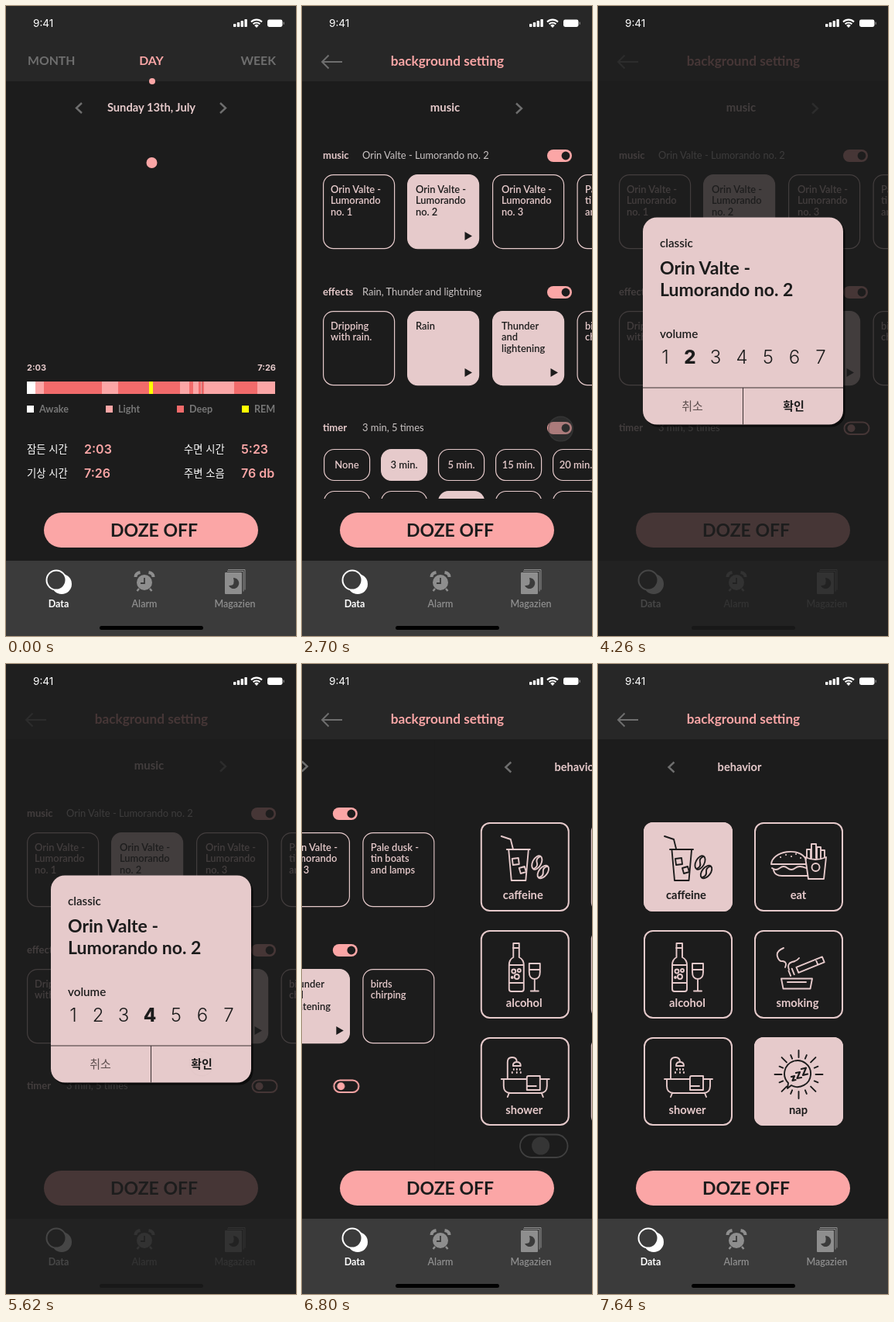
An HTML page for the animation above (8000 ms loop, 375x812 px).

```html
<!DOCTYPE html>
<html lang="ko">
<head>
<meta charset="utf-8">
<title>Sleep app</title>
<style>
html, body { margin: 0; width: 100%; height: 100%; overflow: hidden; background: #1c1c1c; }
svg { display: block; }
text { font-family: Lato, sans-serif; white-space: pre; }
.n { font-family: Inter, sans-serif; }
.k { font-family: 'Noto Sans CJK KR', 'Noto Sans CJK', sans-serif; }
.icon { fill: none; stroke-width: 1.9; stroke-linecap: round; stroke-linejoin: round; }
</style>
</head>
<body>
<svg id="stage" width="375" height="812" viewBox="0 0 375 812"></svg>
<script>
const PINK = '#fba6a6', PALE = '#e6cacb', DARK = '#1c1c1c', RED = '#f26b6b', GREY = '#6e6e6e';
const LOOP = 8000, PAGE_GAP = 449;

// Drawing helpers
const text = (x, y, s, size, fill, { w = 400, a = 'start', c = '', id = '' } = {}) =>
  `<text id="${id}" class="${c}" x="${x}" y="${y}" font-size="${size}" font-weight="${w}" fill="${fill}" text-anchor="${a}">${s}</text>`;
const rect = (x, y, w, h, fill, r = 0, extra = '') =>
  `<rect x="${x}" y="${y}" width="${w}" height="${h}" rx="${r}" fill="${fill}" ${extra}/>`;
const disc = (x, y, r, fill, extra = '') => `<circle cx="${x}" cy="${y}" r="${r}" fill="${fill}" ${extra}/>`;
const line = (d, stroke, w = 2, extra = '') => `<path d="${d}" fill="none" stroke="${stroke}" stroke-width="${w}" ${extra}/>`;
const group = (id, body, extra = '') => `<g id="${id}" ${extra}>${body}</g>`;
const chevron = (x, y, dir) => line(`M${x - 3.5 * dir} ${y - 6.5}l${7 * dir} 6.5l${-7 * dir} 6.5`, GREY, 2.4);

function statusBar() {
  const bars = [4, 6, 8, 10].map((h, i) => rect(294 + i * 4.8, 27 - h, 3.4, h, '#fff', 0.8)).join('');
  const wifi = line('M317 20.5a10 10 0 0 1 14 0M319.6 23.3a6.4 6.4 0 0 1 8.8 0', '#fff', 2.1) +
    '<path d="M324 28l-2.8-3a4 4 0 0 1 5.6 0z" fill="#fff"/>';
  return text(35, 27, '9:41', 13.6, '#fff', { c: 'n' }) + bars + wifi +
    rect(338, 17.5, 19.5, 9.5, '#fff', 2.4) + rect(358.5, 20.5, 1.5, 3.5, '#777', 0.7);
}

function dataPage() {
  const P = PINK, stages = [[27, '#fff'], [38, P], [49, RED], [124, P], [145, RED], [185, '#ff0'], [190, RED], [225, P],
    [237, RED], [242, P], [249, RED], [252, P], [253.5, RED], [256, P], [295, RED], [325, P], [348]];
  const bar = stages.slice(0, -1).map(([x, c], i) => rect(x, 484, stages[i + 1][0] - x, 16, c)).join('');
  const legend = [[27, '#fff', 'Awake'], [129, P, 'Light'], [221, RED, 'Deep'], [305, '#ff0', 'REM']]
    .map(([x, c, s]) => rect(x, 515, 9, 9, c) + text(x + 16, 524, s, 12.6, '#777', { w: 700 })).join('');
  const facts = [[27, 576, '잠든 시간', '2:03'], [27, 607, '기상 시간', '7:26'], [230, 576, '수면 시간', '5:23'], [230, 607, '주변 소음', '76 db']]
    .map(([x, y, s, v]) => text(x, y, s, 13.3, '#fff', { w: 500, c: 'k' }) + text(x + 74, y + 1, v, 16, P, { w: 600, c: 'n' })).join('');
  const small = { w: 700, c: 'n' };
  return text(28, 76, 'MONTH', 15.8, GREY, { w: 700 }) + text(188, 76, 'DAY', 15.8, P, { w: 700, a: 'middle' }) +
    text(349, 76, 'WEEK', 15.8, GREY, { w: 700, a: 'end' }) + disc(189, 97, 4, P) +
    chevron(94.5, 131.5, -1) + chevron(280.5, 131.5, 1) +
    text(188, 136, 'Sunday 13th, July', 14.7, PALE, { w: 700, a: 'middle' }) +
    group('score', disc(188.5, 309.5, 108, 'none', `stroke="${P}" stroke-width="1.3"`) +
      text(134, 318, '6<tspan dy="7">7</tspan>', 70, P) + text(207, 326, '/100', 15.3, P, { w: 300 }) +
      text(142, 361, '잠을 설치셨나요? :(', 12.6, PALE, { w: 350, c: 'k' })) +
    group('dot', disc(188.5, 202, 7, P)) +
    text(27, 470, '2:03', 11, PALE, small) + text(349, 470, '7:26', 11, PALE, { ...small, a: 'end' }) + bar + legend + facts;
}

const toggle = y => rect(317, y - 8, 32, 16, PINK, 8) + disc(341, y, 5.4, DARK);
function card(x, y, tx, lines, on) {
  return rect(x + 0.6, y + 0.6, 92, 95, on ? PALE : 'none', 13, `stroke="${PALE}" stroke-width="1.2"`) +
    lines.map((s, i) => text(tx, y + 24 + i * 14.4, s, 12.9, on ? DARK : PALE, { w: 600 })).join('') +
    (on ? `<path d="M${tx + 63.5} ${y + 74}l9.5 5.5l-9.5 5.5z" fill="${DARK}"/>` : '');
}
const rowHead = (y, name, info) => text(27, y, name, 13, PALE, { w: 700 }) + text(78, y, info, 12.9, '#c9c3c3');

function musicPage() {
  const xs = [[27, 37], [136, 147], [246, 258], [355.5, 366]];
  const cards = (y, list, on) => list.map((s, i) => card(xs[i][0], y, xs[i][1], s.split('/'), on.includes(i))).join('');
  const pill = (i, y, on) => rect(28.6 + 74 * i, y, 59, 40, on ? PALE : 'none', 13, `stroke="${PALE}" stroke-width="1.2"`);
  const times = ['None', '3 min.', '5 min.', '15 min.', '20 min.'].map((s, i) =>
    pill(i, 571.5, i == 1) + text(58 + 74 * i, 595.5, s, 13, i == 1 ? DARK : PALE, { w: 600, a: 'middle' }) + pill(i, 625.5, i == 2)).join('');
  const song = n => `Orin Valte -/Lumorando/no. ${n}`;
  return text(185, 136, 'music', 14.9, PALE, { w: 700, a: 'middle' }) + chevron(280.5, 132, 1) +
    rowHead(197, 'music', 'Orin Valte - Lumorando no. 2') + toggle(193) +
    cards(217, [song(1), song(2), song(3), 'Pale dusk -/tin boats/and lamps'], [1]) +
    rowHead(373, 'effects', 'Rain, Thunder and lightning') + toggle(369) +
    cards(393, ['Dripping/with rain.', 'Rain', 'Thunder/and/lightening', 'birds/chirping'], [1, 2]) +
    rowHead(548, 'timer', '3 min, 5 times') +
    group('timerOn', toggle(544) + `<svg y="560" width="375" height="75" viewBox="0 560 375 75">${times}</svg>`) +
    group('timerOff', rect(318.5, 536.5, 32, 15.5, 'none', 7.8, `stroke="${PINK}" stroke-width="2"`) + disc(327.5, 544.2, 5, PINK));
}

const sunRays = Array.from({ length: 16 }, (_, i) => {
  const a = i * Math.PI / 8, p = r => `${(259.5 + r * Math.sin(a)).toFixed(1)} ${(529 - r * Math.cos(a)).toFixed(1)}`;
  return `M${p(22)}L${p(i % 2 ? 27 : 31)}`;
}).join('');

// name, column, row, label centre, icon path, extra icon markup
const habits = [
  ['caffeine', 0, 0, 114, 'M86 222l12 4l3 12M93 239h30M95.500 240l3.500 39h18.500l3.500-39M100 251l8-1l1 8l-8 1zM109 263l7-2l2 7l-7 2z',
    '<g transform="rotate(28 132 256)"><ellipse cx="132" cy="256" rx="5.500" ry="9.500"/><path d="M132 247q-4 5 0 9t0 9"/></g><g transform="rotate(38 140 268)"><ellipse cx="140" cy="268" rx="5.500" ry="9.500"/><path d="M140 259q-4 5 0 9t0 9"/></g>'],
  ['eat', 1, 0, 259, 'M224 258c1-17 37-23 45-6M224 258h45M225 263q5 4 10 0t10 0t10 0t14 0M227 266q2 7 11 7h33M268 249l4 28h20l3-28q-14 6-27 0zM270 249v-10h5v11M276 250v-18h6v18M283 250v-14h5v14M288 240h5v9M236 249h.1M243 246h.1M250 248h.1M256 245h.1M262 250h.1',
    '<circle cx="281.500" cy="262" r="5"/>'],
  ['alcohol', 0, 1, 115.5, 'M101.500 360h7.500v18q6 3 6 10v31q0 3-3 3h-13q-3 0-3-3v-31q0-7 5.500-10zM101 366h8M96 388h19M96 411h19M122 386h14v11q0 9-7 9t-7-9zM122 394h14M129 406v15M124 421.500h10',
    '<circle cx="102" cy="396" r="2.500"/><circle cx="109" cy="395" r="2"/><circle cx="106" cy="403" r="3"/><circle cx="100" cy="404" r="1"/>'],
  ['smoking', 1, 1, 258, 'M240 366q-10 4-8 11t7 6q6 1 3 8M247 394q-3-8 4-10q6-1 9-5M237 405.500h40l-2.500 13h-35zM245 410h24',
    '<g transform="rotate(-22 268 390)"><path d="M257 386.500h36v7.500h-36zM284 386.500v7.500M251 386v8M246 387v7"/></g>'],
  ['shower', 0, 2, 115.5, 'M94 534v-21q0-6 6-6t6 6M101 518q0-5 5-5t5 5zM102 522v1M106 522v1M110 522v1M100 526v1M106 526v1M111 526v1M86 535h33M136 535h12M89 535v9q0 9 9 9h38q9 0 9-9v-9M96 553l-2 5M138 553l2 5M121 531h15v18h-17v-16q0-2 2-2zM119 544h12', ''],
  ['nap', 1, 2, 259, sunRays + 'M250 543l-5 4l1-7a17 17 0 1 1 4 3z',
    '<g stroke-width="2.200"><path d="M250 532l4-1l-2.500 6l4-1M256 527l5-1l-3.500 8l5.500-1M263 522l6-1.500l-4 9.500l6-1.500"/></g>']
];
function habitCard([name, col, row, cx, d, extra], on) {
  const x = 60 + 143 * col, y = [205, 344, 482][row], ink = on ? DARK : PALE;
  return rect(x, y, 113, row ? 112 : 113, on ? PALE : DARK, 11, `stroke="${PALE}" stroke-width="2"`) +
    `<g class="icon" stroke="${ink}"><path d="${d}"/>${extra}</g>` +
    text(cx, [303, 442, 580][row], name, 14.7, ink, { w: 700, a: 'middle' });
}
function behaviorPage() {
  return rect(0, 98, 375, 555, DARK) +
    chevron(95, 133, -1) + text(183, 138, 'behavior', 14.6, PALE, { w: 700, a: 'middle' }) +
    habits.map(h => habitCard(h, false)).join('') +
    group('caffeineOn', habitCard(habits[0], true)) + group('napOn', habitCard(habits[5], true));
}

function tabBar() {
  const g = '#8e8e8e', bg = '#3b3b3b';
  const label = (x, s, c, w) => text(x, 775, s, 12.5, c, { w, a: 'middle' });
  return rect(0, 715, 375, 97, bg) +
    disc(72, 745, 13, '#fff') + disc(65, 740, 12.5, bg, 'stroke="#fff" stroke-width="2"') +
    line('M167.500 736q0-5 6-6M190.500 736q0-5-6-6', g, 4) + line('M172 751l-2.500 3M186 751l2.500 3', g, 2.5) +
    disc(179, 743, 10, g) + line('M179 737v7h-5', bg, 1.8) +
    line('M286 728.500h21v26M287 726.500h22v26', g, 1) + rect(283, 730, 22, 28, g, 1) +
    `<path d="M294 737a7 7 0 1 1-6 10q9 1 6-10z" fill="${bg}"/>` +
    label(68, 'Data', '#fff', 700) + label(179, 'Alarm', g, 600) + label(296, 'Magazien', g, 600) +
    rect(121, 799, 134, 5, '#000', 2.5);
}

function dialog() {
  const nums = [87, 119, 152, 186, 220, 254, 288].map((x, i) =>
    text(x, 461, i + 1, 24, DARK, { w: 300, a: 'middle', c: 'n', id: 'thin' + (i + 1) }) +
    ([1, 3].includes(i) ? text(x, 461, i + 1, 24, DARK, { w: 800, a: 'middle', c: 'n', id: 'bold' + (i + 1) }) : '')).join('');
  return rect(60.5, 275.5, 259, 267, '#000', 18, 'opacity=".6"') + rect(58, 272.5, 259, 267, PALE, 18) +
    text(80, 311, 'classic', 15.2, DARK, { w: 600 }) +
    text(80, 346, 'Orin Valte -', 23, DARK, { w: 700 }) + text(80, 374, 'Lumorando no. 2', 23, DARK, { w: 700 }) +
    text(80, 427.5, 'volume', 15.2, DARK, { w: 600 }) + nums + line('M58 492h259M187.500 492v47.500', '#3a3030', 1) +
    text(122, 521, '취소', 15, '#5d4e4e', { w: 500, a: 'middle', c: 'k' }) + text(253, 521, '확인', 15, DARK, { w: 700, a: 'middle', c: 'k' });
}

// Touch markers: x, y, appear, press, gone
const taps = [
  [189, 674, 760, 960, 1590], [334.5, 545, 2700, 2900, 3490], [182, 295.5, 3640, 3840, 4260],
  [186, 452, 4560, 4760, 5160], [253, 515, 5180, 5380, 5630]
];
const ring = 'stroke="#404040" stroke-width="1.8"';

document.getElementById('stage').innerHTML =
  rect(0, 0, 375, 812, DARK) + rect(0, 0, 375, 97, '#272727') +
  group('data', dataPage()) +
  group('settings', line('M52 72h-26M34.500 63.500l-8.500 8.500l8.500 8.500', GREY, 2) +
    text(188, 77, 'background setting', 17.2, PINK, { w: 700, a: 'middle' }) +
    group('pages', musicPage() + group('', behaviorPage(), `transform="translate(${PAGE_GAP})"`))) +
  rect(49, 653, 277, 45, PINK, 22.5) + text(191.5, 684, 'DOZE OFF', 23, DARK, { w: 700, a: 'middle' }) +
  tabBar() +
  group('modal', rect(0, 0, 375, 812, '#1e1e1e', 0, 'opacity=".82"') + dialog()) +
  statusBar() +
  taps.map(([x, y], i) => group('tap' + i, disc(x, y, 15.6, 'none', ring) + disc(x, y, 15, '#444', 'fill-opacity=".65"'))).join('') +
  group('swipe', rect(282, 606.5, 61.5, 29.5, 'none', 14.7, ring) + disc(0, 621, 11.5, '#444', 'id="thumb" fill-opacity=".65"'));

const $ = id => document.getElementById(id);
const fade = (id, v) => $(id).setAttribute('opacity', v);
const ramp = (t, a, b) => Math.min(1, Math.max(0, (t - a) / (b - a)));

// cubic-bezier(.42, 0, .58, 1) between times a and b
function ease(t, a, b) {
  const p = ramp(t, a, b);
  let lo = 0, hi = 1, s = p;
  for (let i = 0; i < 20; i++) {
    const x = 1.26 * s * (1 - s) ** 2 + 1.74 * s * s * (1 - s) + s ** 3;
    if (x < p) lo = s; else hi = s;
    s = (lo + hi) / 2;
  }
  return p == 0 || p == 1 ? p : s * s * (3 - 2 * s);
}

function draw(t) {
  const intro = ease(t, 0, 510);
  $('dot').setAttribute('transform', `rotate(${241 * intro} 188.5 309.5)`);
  fade('score', intro);

  const open = ease(t, 1130, 1570);
  fade('data', 1 - open);
  fade('settings', open);

  const off = ease(t, 3060, 3490);
  fade('timerOn', 1 - off);
  fade('timerOff', off);

  fade('modal', t < 5780 ? ease(t, 3960, 4260) : 0);
  const volume = ease(t, 4920, 5160);
  fade('bold2', 1 - volume);
  fade('thin2', volume);
  fade('bold4', volume);
  fade('thin4', 1 - volume);

  taps.forEach(([, , a, press, end], i) => {
    fade('tap' + i, t < a ? 0 : ramp(t, a - 120, a + 60) * (1 - ease(t, Math.min(press + 170, end - 120), end)));
    $('tap' + i).lastChild.setAttribute('r', 15 - 4 * ease(t, press, press + 160));
  });

  const slide = ease(t, 6380, 7120);
  $('pages').setAttribute('transform', `translate(${-PAGE_GAP * slide})`);
  $('thumb').setAttribute('cx', 329 - 33 * slide);
  fade('swipe', ramp(t, 6400, 6480) * (1 - ramp(t, 7100, 7220)));
  fade('napOn', +(t >= 7360));
  fade('caffeineOn', +(t >= 7640));
}

const start = performance.now();
function tick() {
  draw((performance.now() - start) % LOOP);
  requestAnimationFrame(tick);
}
tick();
</script>
</body>
</html>
```
